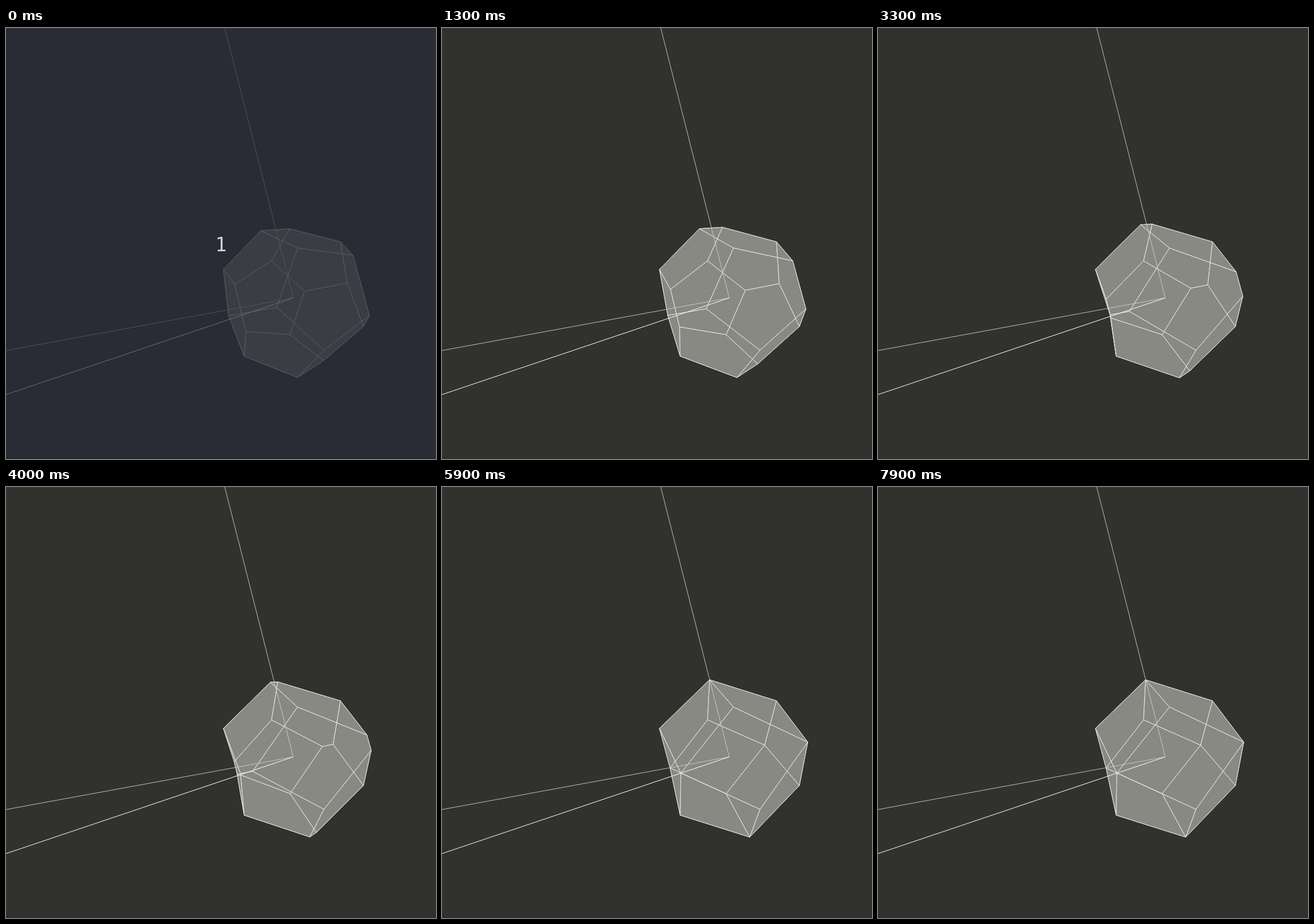
An HTML page with a canvas that plays this animation: 747x749 px, repeating every 8000 ms.

```html
<!DOCTYPE html>
<html lang="en">
<head>
<meta charset="utf-8">
<title>Dodecahedron morph</title>
<style>
  html, body { margin: 0; width: 100%; height: 100%; overflow: hidden; background: #31322d; }
  canvas { display: block; }
</style>
</head>
<body>
<canvas id="stage" width="747" height="749"></canvas>
<script>
const ctx = document.getElementById('stage').getContext('2d');
const LOOP = 8000, STEP = 100;
const CENTER = [499, 469];
// Perspective image of each unit axis: dx, dy, change of depth
const AXES = [[-63.9, 12, 0.0765], [-19, -74.5, 0.011], [-38.7, 12.9, -0.085]];
// Morph progress: time, share
const MORPH = [[300, 0], [1300, 0.203], [2500, 0.458], [3300, 0.6], [4600, 0.874], [5250, 1]];
const INTRO = { bg: '#292c34', fill: '#3a3d44', line: '#565960', axis: '#54575c', bright: '#6a6c71', top: '#35383f', bottom: '#202329' };
const MAIN = { bg: '#31322d', fill: '#888983', line: '#e2e3df', axis: '#cfd0cc', bright: '#f4f4f2', top: '#3a3b37', bottom: '#282925' };

const mix = (a, b, k) => a + (b - a) * k;

function progress(t) {
  if (t <= MORPH[0][0]) return 0;
  for (let i = 1; i < MORPH.length; i++) {
    const [t0, a] = MORPH[i - 1], [t1, b] = MORPH[i];
    if (t < t1) return mix(a, b, (t - t0) / (t1 - t0));
  }
  return 1;
}

function project(v) {
  const sum = k => v.reduce((acc, c, i) => acc + c * AXES[i][k], 0);
  const depth = 1 + sum(2);
  return [CENTER[0] + sum(0) / depth, CENTER[1] + sum(1) / depth];
}

// Twelve pentagons: cube corners stay, roof edges (far, gap) move
function faces(far, gap) {
  const list = [];
  for (let axis = 0; axis < 3; axis++) {
    for (const s of [-1, 1]) for (const z of [-1, 1]) {
      const points = [[s * far, gap, 0], [s, 1, z], [s * gap, 0, z * far], [s, -1, z], [s * far, -gap, 0]];
      const path = new Path2D();
      for (const p of points) {
        const v = [];
        p.forEach((c, i) => { v[(axis + i) % 3] = c; });
        path.lineTo(...project(v));
      }
      path.closePath();
      list.push(path);
    }
  }
  return list;
}

function line(x, y, color, width) {
  ctx.strokeStyle = color;
  ctx.lineWidth = width;
  ctx.beginPath();
  ctx.moveTo(...CENTER);
  ctx.lineTo(x, y);
  ctx.stroke();
}

function draw(t) {
  const intro = t < STEP, c = intro ? INTRO : MAIN, k = progress(t);
  ctx.fillStyle = c.bg;
  ctx.fillRect(0, 0, 747, 749);
  ctx.fillStyle = c.top;
  ctx.fillRect(0, 0, 747, 1);
  ctx.fillStyle = c.bottom;
  ctx.fillRect(0, 748, 747, 1);

  const edges = new Path2D();
  ctx.fillStyle = c.fill;
  for (const face of faces(mix(1.618, 1.835, k), mix(0.618, 0, k))) {
    ctx.fill(face);
    edges.addPath(face);
  }
  ctx.lineJoin = 'round';
  ctx.strokeStyle = c.line;
  ctx.lineWidth = 0.9;
  ctx.stroke(edges);

  line(380, 0, c.axis, 0.9);
  line(0, 560.5, c.axis, 0.9);
  line(0, 637, c.bright, 1.1);

  if (intro) {
    ctx.fillStyle = '#d2d3d5';
    ctx.font = '33px "DejaVu Sans Mono", monospace';
    ctx.textAlign = 'center';
    ctx.fillText('1', 373.5, 387.5);
  }
}

const start = performance.now();
function tick() {
  const t = (performance.now() - start) % LOOP;
  draw(Math.floor(t / STEP) * STEP);
  requestAnimationFrame(tick);
}
tick();
</script>
</body>
</html>
```
